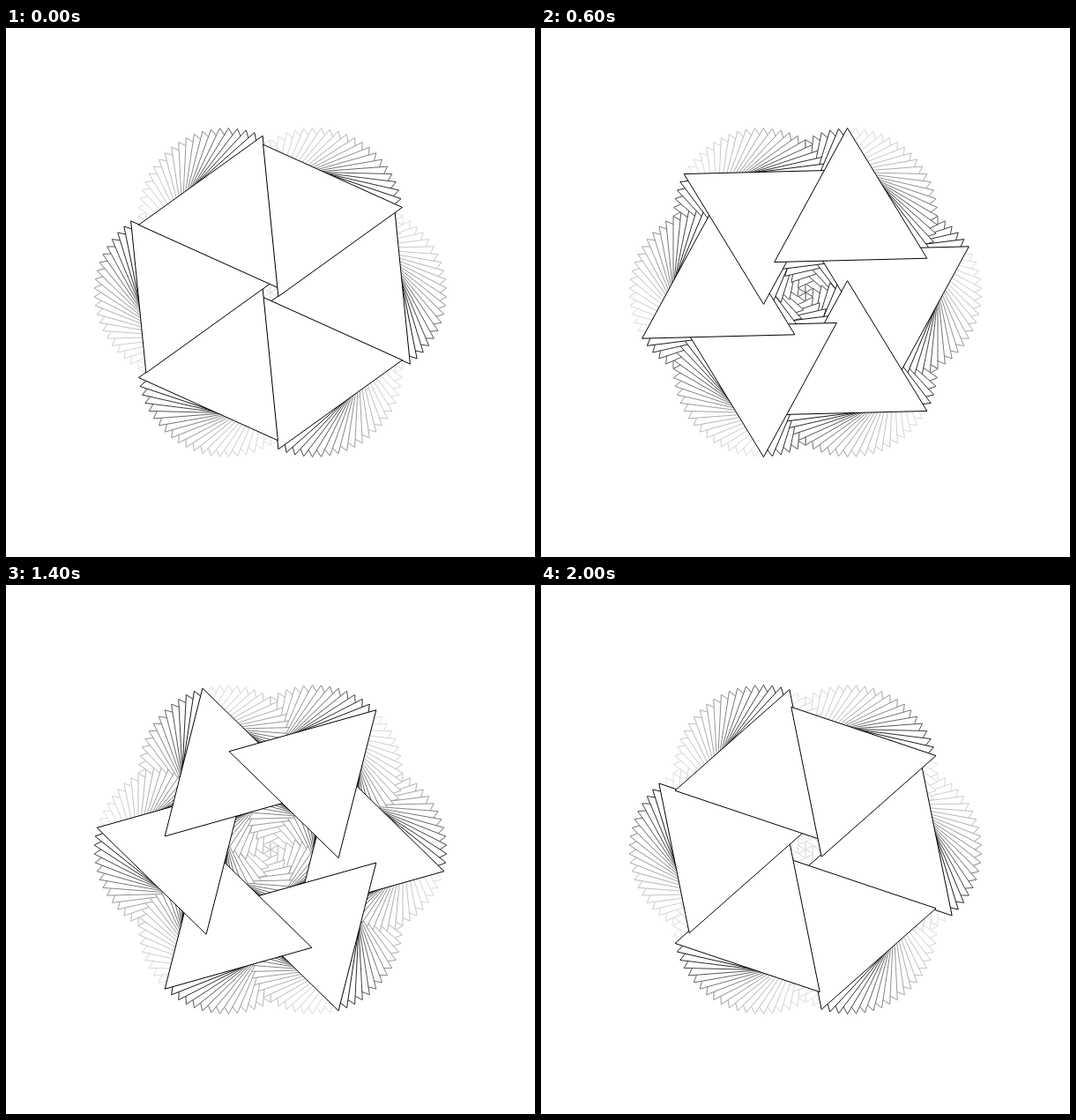
These frames come from a looping animation (600 px wide and 600 px high, 2100 ms). An HTML page with a canvas:

```html
<!DOCTYPE html>
<html lang="en">
<head>
<meta charset="utf-8">
<title>Turning triangles</title>
<style>
html, body { margin: 0; width: 100%; height: 100%; overflow: hidden; background: #fff; }
canvas { display: block; }
</style>
</head>
<body>
<canvas id="stage" width="600" height="600"></canvas>
<script>
const ctx = document.getElementById('stage').getContext('2d');
const STEPS = 21, STEP_MS = 100, RADIUS = 100, FADE = 0.9;
const TURN = Math.PI * 2;

function triangle(x, y, angle) {
  ctx.beginPath();
  for (let v = 0; v < 3; v++) {
    const a = angle + v * TURN / 3;
    ctx.lineTo(x + RADIUS * Math.cos(a), y + RADIUS * Math.sin(a));
  }
  ctx.closePath();
  ctx.fill();
  ctx.stroke();
}

function draw(step) {
  ctx.fillStyle = '#fff';
  ctx.fillRect(0, 0, 600, 600);
  // Oldest pose first; older outlines fade towards white.
  for (let age = STEPS - 1; age >= 0; age--) {
    const grey = Math.round(255 * (1 - FADE ** age));
    ctx.strokeStyle = `rgb(${grey}, ${grey}, ${grey})`;
    const spin = (step - age - 1) * TURN / 3 / STEPS;
    for (let k = 0; k < 6; k++) {
      const a = k * TURN / 6;
      triangle(300 + RADIUS * Math.cos(a), 300 + RADIUS * Math.sin(a), spin + a + TURN / 6);
    }
  }
}

let shown = -1;
const start = performance.now();

function tick() {
  const step = Math.floor((performance.now() - start) / STEP_MS) % STEPS;
  if (step !== shown) draw(shown = step);
  requestAnimationFrame(tick);
}
tick();
</script>
</body>
</html>
```
